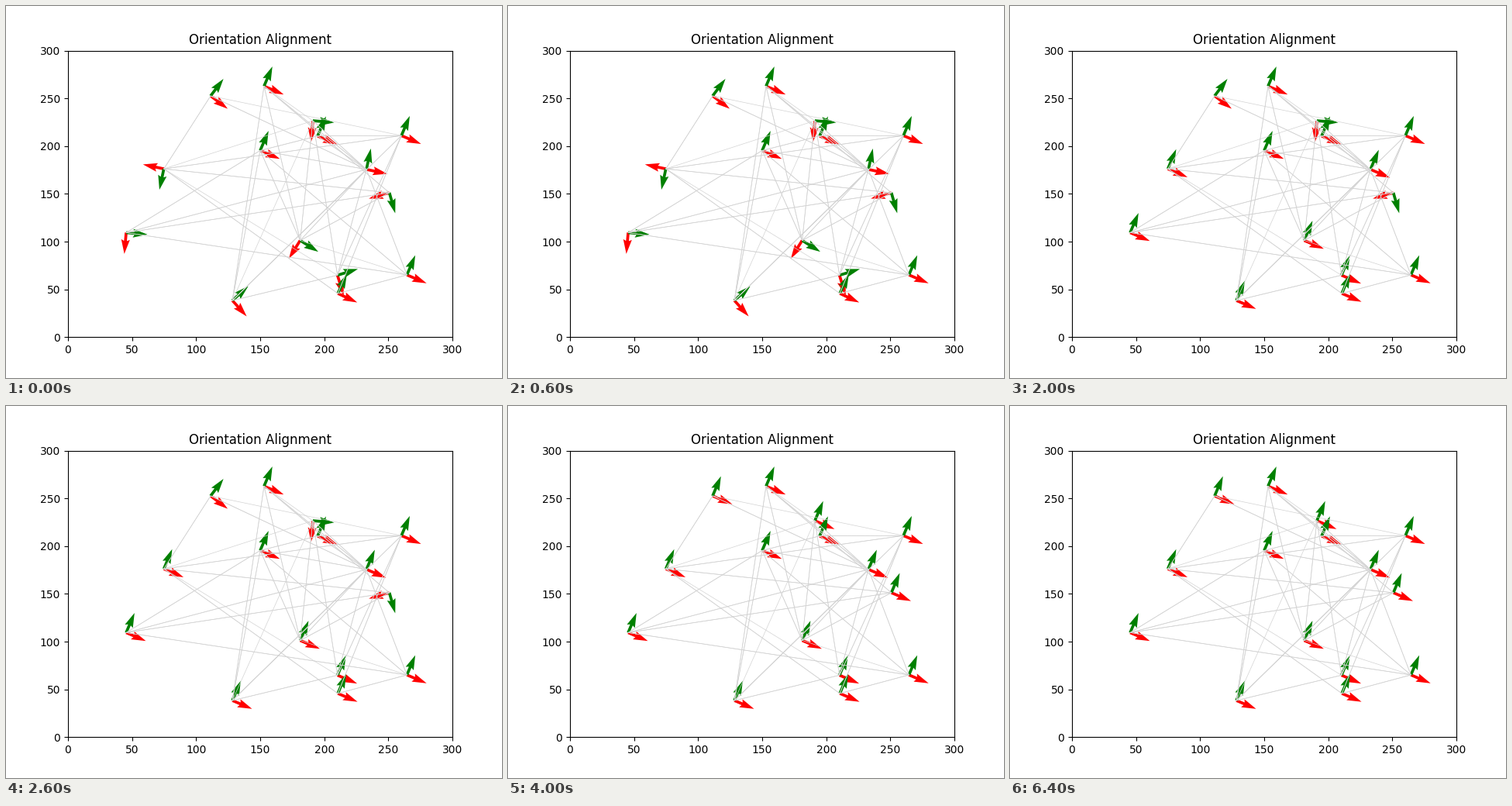
Recreate the animation shown at these times as a matplotlib script. Size 640 by 480 pixels, loop 8 s.

```python
import numpy as np
import matplotlib.pyplot as plt
from matplotlib.animation import FuncAnimation
from matplotlib.collections import LineCollection

STEP = 30
GOAL = -23  # common orientation of the red axis, degrees

# x, y, starting angle of the red axis
AGENTS = {
    "A": (111.3, 252.6, -37),
    "B": (153.0, 262.8, GOAL),
    "C": (191.1, 226.6, -95),
    "D": (194.8, 210.6, GOAL),
    "E": (260.2, 211.0, GOAL),
    "F": (150.0, 195.4, GOAL),
    "G": (74.8, 176.2, 168),
    "H": (232.9, 175.6, -12),
    "I": (250.8, 151.2, 196),
    "J": (45.4, 109.4, -95),
    "K": (181.2, 101.2, -122),
    "L": (128.3, 38.3, -48),
    "M": (210.3, 64.8, -73),
    "N": (210.6, 45.7, -25),
    "O": (264.5, 65.1, GOAL),
}
MUTUAL = ("AG AH BL BK BH BI CM CK CH DE DH DF EG EL EM EN FJ FK FL FO FH "
          "GI GN HJ HL HK HO HM IJ IK JO LM NO").split()
ONE_WAY = "AE BC CG CL GM KO".split()

names = list(AGENTS)
start = np.array([AGENTS[n][:2] for n in names])
angles = np.array([AGENTS[n][2] for n in names], float)
# Number of the round in which each agent is aligned
rounds = np.array([0 if n in "BDEFO" else 2 if n in "ACI" else 1 for n in names])
edges = np.array([[names.index(a), names.index(b)]
                  for a, b in MUTUAL * 2 + ONE_WAY])


def axes_of(theta):
    t = np.radians(theta)
    return np.cos(t), np.sin(t)


def state(i):
    """Positions and angles: aligned agents step out and back each round."""
    k = min(i, 4)
    aligned = rounds <= k // 2
    theta = np.where(aligned, GOAL, angles)
    pos = start.copy()
    if k % 2:
        pos[aligned] += STEP * np.array(axes_of(GOAL + 90))
    return pos, theta


fig, ax = plt.subplots(figsize=(6.4, 4.8), dpi=100)
ax.set(xlim=(0, 300), ylim=(0, 300), title="Orientation Alignment")

pos, theta = state(0)
red = ax.quiver(*pos.T, *axes_of(theta), color="r")
green = ax.quiver(*pos.T, *axes_of(theta + 90), color="g")
links = LineCollection(pos[edges], colors="lightgray", linewidths=0.5, zorder=2)
ax.add_collection(links, autolim=False)


def update(i):
    pos, theta = state(i)
    for arrows, turn in ((red, 0), (green, 90)):
        arrows.set_offsets(pos)
        arrows.set_UVC(*axes_of(theta + turn))
    links.set_segments(pos[edges])
    return red, green, links


anim = FuncAnimation(fig, update, frames=8, interval=1000, repeat=True,
                     repeat_delay=0)
plt.show()
```
